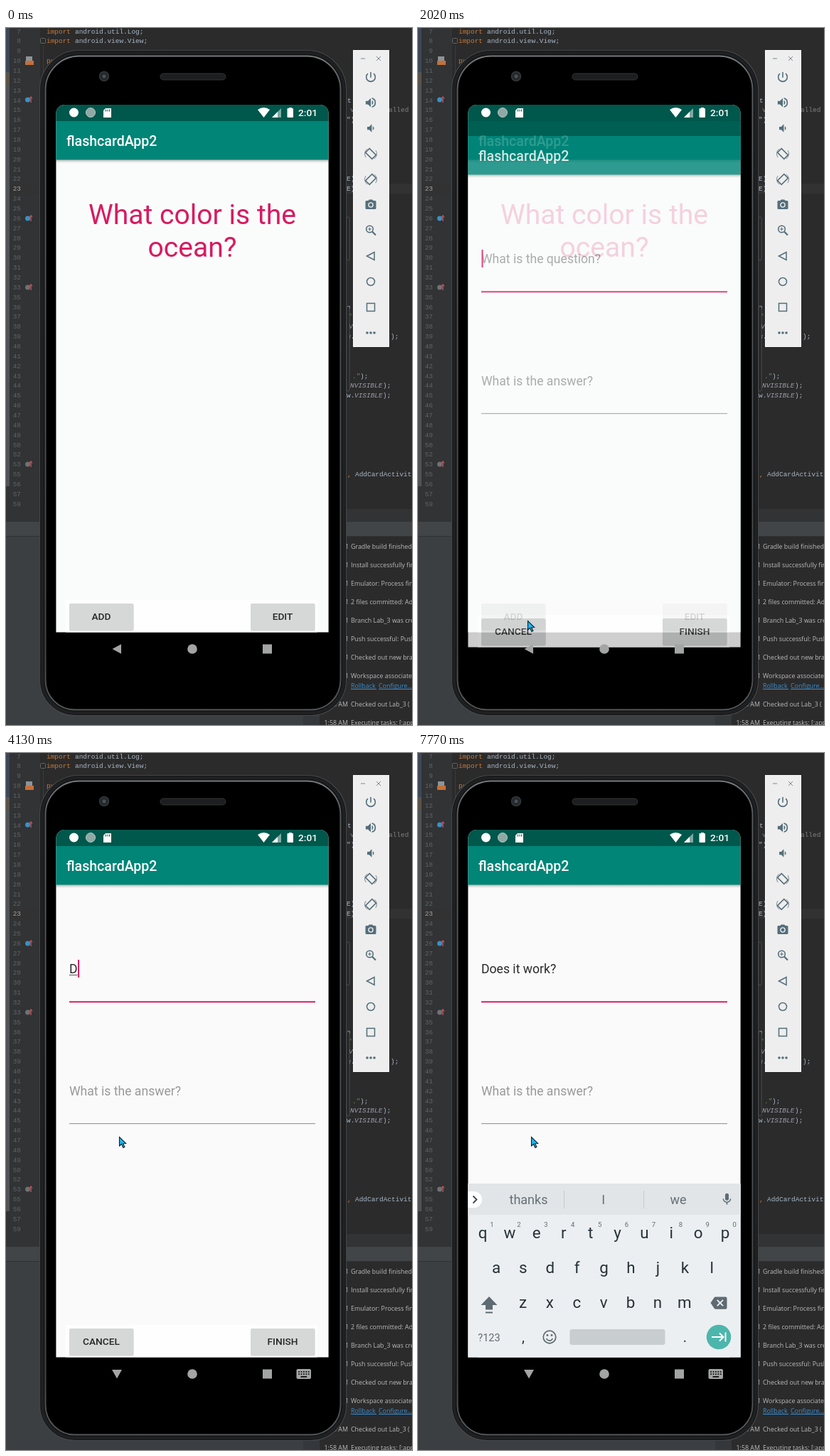
Animation of 571x981 px, one loop 8 s. Source, as an HTML page with a canvas:

```html
<!DOCTYPE html>
<html lang="en">
<head>
<meta charset="utf-8">
<title>Flashcard app</title>
<style>
html, body { margin: 0; width: 100%; height: 100%; overflow: hidden; background: #2b2b2b; }
canvas { display: block; width: 571px; height: 981px; }
</style>
</head>
<body>
<canvas id="stage"></canvas>
<script>
const W = 571, H = 981, LOOP = 8000;
const dpr = window.devicePixelRatio || 1;
const stage = document.getElementById('stage');
const layer = document.createElement('canvas');
for (const c of [stage, layer]) { c.width = W * dpr; c.height = H * dpr; }
const main = stage.getContext('2d'), sheet = layer.getContext('2d');
let g = main;

const ROBOTO = 'Roboto, sans-serif', MONO = '"Liberation Mono", monospace', UI = '"Open Sans", sans-serif';
const PINK = '#d81b60', TEAL = '#008577', DARK_TEAL = '#00574b', SLATE = '#546e7a';
const SP = .978; // screen pixels per Android sp
const sp = (size, weight = 400) => `${weight} ${size * SP}px ${ROBOTO}`;

// ---- helpers ----
function rect(x, y, w, h, color) { g.fillStyle = color; g.fillRect(x, y, w, h); }
function round(x, y, w, h, r, fill, stroke, lw = 1) {
  g.beginPath(); g.roundRect(x, y, w, h, r);
  if (fill) { g.fillStyle = fill; g.fill(); }
  if (stroke) { g.strokeStyle = stroke; g.lineWidth = lw; g.stroke(); }
}
function disc(x, y, r, fill, stroke, lw = 1) {
  g.beginPath(); g.arc(x, y, r, 0, 7);
  if (fill) { g.fillStyle = fill; g.fill(); }
  if (stroke) { g.strokeStyle = stroke; g.lineWidth = lw; g.stroke(); }
}
function poly(pts, fill, stroke, lw = 1, open) {
  g.beginPath();
  for (let i = 0; i < pts.length; i += 2) g.lineTo(pts[i], pts[i + 1]);
  if (!open) g.closePath();
  if (fill) { g.fillStyle = fill; g.fill(); }
  if (stroke) { g.strokeStyle = stroke; g.lineWidth = lw; g.stroke(); }
}
function text(s, x, y, font, color, align = 'left') {
  g.font = font; g.fillStyle = color; g.textAlign = align; g.fillText(s, x, y);
}
function icon(d, cx, cy, size, color) {
  g.save();
  g.translate(cx - size / 2, cy - size / 2); g.scale(size / 24, size / 24);
  g.fillStyle = color; g.fill(new Path2D(d), 'evenodd');
  g.restore();
}
function track(keys, t) {
  if (t <= keys[0][0]) return keys[0].slice(1);
  for (let i = 1; i < keys.length; i++) {
    const [a, ...p] = keys[i - 1], [b, ...q] = keys[i];
    if (t < b) return p.map((v, j) => v + (q[j] - v) * (t - a) / (b - a));
  }
  return keys[keys.length - 1].slice(1);
}
const smooth = k => k * k * (3 - 2 * k);

const ICON = {
  power: 'M13 3h-2v10h2zM17.8 5.2l-1.4 1.4a7 7 0 1 1-8.8 0L6.2 5.2a9 9 0 1 0 11.6 0z',
  loud: 'M3 9v6h4l5 5V4L7 9zM14 8a4.5 4.5 0 0 1 0 8zM14 3.2v2.1a7 7 0 0 1 0 13.4v2.1a9 9 0 0 0 0-17.6z',
  quiet: 'M5 9v6h4l5 5V4L9 9zM16 8a4.5 4.5 0 0 1 0 8z',
  camera: 'M9 2L7.2 4H4a2 2 0 0 0-2 2v12a2 2 0 0 0 2 2h16a2 2 0 0 0 2-2V6a2 2 0 0 0-2-2h-3.2L15 2zM12 7a5 5 0 1 1 0 10a5 5 0 1 1 0-10zM12 8.8a3.2 3.2 0 1 0 0 6.4a3.2 3.2 0 1 0 0-6.4z',
  erase: 'M22 3H7c-.7 0-1.2.3-1.6.9L0 12l5.4 8.1c.4.5.9.9 1.6.9h15a2 2 0 0 0 2-2V5a2 2 0 0 0-2-2zM19 15.6L17.6 17 14 13.4 10.4 17 9 15.6l3.6-3.6L9 8.4 10.4 7l3.6 3.6L17.6 7 19 8.4 15.4 12z',
  mic: 'M12 14a3 3 0 0 0 3-3V5a3 3 0 0 0-6 0v6a3 3 0 0 0 3 3zM17.3 11a5.3 5.1 0 0 1-10.6 0H5a7 7 0 0 0 6 6.7V21h2v-3.3a7 7 0 0 0 6-6.7z'
};

// ---- code editor behind the phone ----
const FOLDED = [34, 51, 54, 58];
const CONST = '#a09cab';
const row = i => 4.5 + 13.86 * i;
function code(s, x, y, color = '#a9b7c6', style = '') {
  text(s, x, y + 3, style + ' 9.46px ' + MONO, color);
}
function drawEditor() {
  rect(0, 0, W, H, '#2b2b2b');
  rect(0, 0, 48, 695, '#313335');
  rect(0, 0, 5, 645, '#505456');
  rect(0, 0, 5, 62, '#3d4757');
  rect(0, 64, 5, 16, '#5b5348');
  rect(5, row(16) - 7, W, 14, '#323232');
  for (let n = 7, i = 0; n < 60; n++) {
    if (FOLDED.includes(n)) continue;
    text(n, 21, row(i) + 3, '9.4px ' + MONO, n === 23 ? '#a4a3a3' : '#606366', 'right');
    i++;
  }
  rect(52, 24, 1, 660, '#3a3c3d');
  for (const [i, pkg] of [[0, 'android.util.Log;'], [1, 'android.view.View;']]) {
    code('import', 57, row(i), '#cc7832');
    code(pkg, 97, row(i));
  }
  round(48.5, 14.5, 7, 7, 1, '#2b2b2b', '#606366');
  code('public', 57, row(3), '#cc7832');
  rect(28, 40, 9, 6, '#8d9499');
  rect(27, 46, 12, 6, '#c4703a');
  [[101, '#3592c4'], [268, '#3592c4'], [365, '#6e7274'], [614, '#6e7274']].forEach(([y, c]) => {
    disc(30.5, y, 3.5, c);
    poly([35, y + 4, 35, y - 4], null, '#db5860', 1.2, true);
    poly([33, y - 1.5, 35, y - 4.5, 37, y - 1.5], null, '#db5860', 1, true);
  });

  code('t', 480, row(7));
  code('v', 484, row(8), '#808080');
  code('alled', 538, row(8), '#808080');
  code('")', 479, row(9));
  code('E)', 479, row(15)); code('E)', 479, row(16));
  code('e', 479, row(28)); code('"', 481, row(29), '#6a8759');
  code('V', 482, row(30), CONST, 'italic');
  code('w.', 479, row(31)); code(');', 541, row(31));
  code('."', 487, row(35), '#6a8759'); code(');', 498, row(35));
  code('NVISIBLE', 484, row(36), CONST, 'italic'); code(');', 530, row(36));
  code('w.', 479, row(37)); code('VISIBLE', 490, row(37), CONST, 'italic'); code(');', 530, row(37));
  code(',', 480, row(45), '#cc7832'); code('AddCardActivity', 491, row(45));

  // event log
  const font = '8.9px ' + UI;
  rect(0, 677, W, 18, '#313335');
  rect(0, 695, W, 286, '#3c3f41');
  rect(0, 695, W, 20, '#414547');
  rect(0, 715, W, 1, '#2f3133');
  rect(418, 716, 24, 265, '#35383a');
  rect(441, 716, 130, 265, '#2b2b2b');
  ['Gradle build finished', 'Install successfully fin', 'Emulator: Process fini', '2 files committed: Add',
   'Branch Lab_3 was crea', 'Push successful: Push', 'Checked out new bran', 'Workspace associated',
   '', 'Checked out Lab_3 (', 'Executing tasks: [:app'].forEach((s, i) => {
    const y = i < 8 ? 733 + 26 * i : i === 9 ? 955 : 980.5;
    if (!s) return;
    text(s, 485, y, font, '#bbbbbb');
    text('1:58 AM', 481, y, font, '#bbbbbb', 'right');
  });
  text('Rollback', 485, 929, font, '#3b8fd0');
  text('Configure...', 524, 929, font, '#3b8fd0');
  rect(485, 930, 36, 1, '#3b8fd0'); rect(524, 930, 47, 1, '#3b8fd0');
}

// ---- phone body and side tools ----
function drawPhone() {
  round(479, 266, 4, 61, 2, '#232425', '#4c4e50');
  round(479, 392, 4, 119, 2, '#232425', '#4c4e50');
  const rim = g.createLinearGradient(0, 31, 0, 968);
  rim.addColorStop(0, '#7d8082'); rim.addColorStop(.06, '#58595b');
  rim.addColorStop(.9, '#434547'); rim.addColorStop(1, '#58595b');
  const shell = (inset, fill, stroke, lw) => {
    const top = 56 - inset, low = 50 - inset;
    round(47 + inset, 31 + inset, 432 - 2 * inset, 937 - 2 * inset, [top, top, low, low], fill, stroke, lw);
  };
  shell(.5, '#121314', '#45474a', 1.2);
  shell(4, null, '#1f2021', 4);
  shell(8.5, '#000', rim, 2);
  disc(138, 68, 6.5, '#25282a', '#343739', 1.5);
  disc(138, 68, 2.5, '#47525a');
  round(217, 64, 92, 9, 4.5, '#1d1e1f', '#323435');
}
function drawTools() {
  rect(488, 31, 51, 418, '#eeeeee');
  g.strokeStyle = '#fafafa'; g.lineWidth = 1; g.strokeRect(488.5, 31.5, 50, 417);
  const x = 513;
  poly([499, 43, 505, 43], null, '#7d878c', 1, true);
  poly([521, 40, 527, 46], null, '#7d878c', 1, true);
  poly([527, 40, 521, 46], null, '#7d878c', 1, true);
  icon(ICON.power, x, 69, 19, SLATE);
  icon(ICON.loud, x, 105, 19, SLATE);
  icon(ICON.quiet, x, 141, 17, SLATE);
  for (const [y, flip] of [[177, 1], [213, -1]]) {
    g.save(); g.translate(x, y); g.scale(flip, 1);
    g.save(); g.rotate(Math.PI / 4);
    g.strokeStyle = SLATE; g.lineWidth = 1.6; g.strokeRect(-6.5, -4, 13, 8);
    g.restore();
    g.beginPath(); g.arc(0, 0, 8.5, 2.5, 4.1); g.stroke();
    g.beginPath(); g.arc(0, 0, 8.5, -.6, 1); g.stroke();
    g.restore();
  }
  icon(ICON.camera, x, 249, 18, SLATE);
  disc(x - 1.5, 283, 4.8, null, SLATE, 1.6);
  poly([x + 2, 286.5, x + 7, 291.5], null, SLATE, 2.2, true);
  poly([x - 4, 283, x + 1, 283], null, SLATE, 1, true);
  poly([x - 1.5, 280.5, x - 1.5, 285.5], null, SLATE, 1, true);
  poly([x - 5.5, 321, x + 5, 315.5, x + 5, 326.5], null, SLATE, 1.5);
  disc(x, 357, 5.5, null, SLATE, 1.5);
  poly([x - 5.5, 387.5, x + 5.5, 387.5, x + 5.5, 398.5, x - 5.5, 398.5], null, SLATE, 1.5);
  for (const dx of [-5, 0, 5]) disc(x + dx, 429, 1.8, SLATE);
}

// ---- app screens ----
function drawAppBase(bg) {
  rect(70, 108, 384, 742.5, bg);
  rect(70, 108, 384, 23, DARK_TEAL);
  const shade = g.createLinearGradient(0, 185, 0, 190);
  shade.addColorStop(0, 'rgba(0,0,0,.28)'); shade.addColorStop(1, 'rgba(0,0,0,0)');
  rect(70, 185, 384, 5, shade);
  rect(70, 131, 384, 54.5, TEAL);
  text('flashcardApp2', 85, 166, sp(20, 500), '#fff');
  rect(84, 805, 354, 45.5, '#fefefe');
}
function drawStatus() {
  disc(95.5, 119, 6.5, '#fff');
  disc(119, 119, 6.5, '#8fa9a4', '#b5c7c3', 1);
  poly([140, 113, 148, 113, 148, 126, 137, 126, 137, 116], '#fff');
  for (const dx of [0, 2.5, 5]) rect(140 + dx, 114.5, 1, 3, DARK_TEAL);
  g.beginPath(); g.moveTo(362.5, 126); g.lineTo(354, 115); g.quadraticCurveTo(362.5, 109, 371, 115);
  g.closePath(); g.fillStyle = '#fff'; g.fill();
  poly([374, 126, 387, 126, 387, 113], '#7fa8a2');
  poly([374, 126, 382, 126, 382, 118], '#fff');
  rect(398, 112, 4, 2, '#fff');
  round(395.5, 113, 8.5, 13, 1, '#fff');
  text('2:01', 411, 124.3, sp(14, 500), '#fff');
}
function button(x, label) {
  round(x, 811, 90.5, 37.5, 2, 'rgba(0,0,0,.16)');
  round(x, 810, 90.5, 37, 2, '#d6d7d7');
  text(label, x + 45, 833, sp(14, 500), '#262727', 'center');
}
function drawCardScreen(t) {
  drawAppBase('#fafcfb');
  text('What color is the', 262, 276, sp(40), PINK, 'center');
  text('ocean?', 262, 322, sp(40), PINK, 'center');
  button(89, 'ADD'); button(344, 'EDIT');
  const k = Math.min(1, (t - 1490) / 210);
  if (k < 0) return;
  g.save();
  g.beginPath(); g.roundRect(89, 810, 90.5, 37, 2); g.clip();
  rect(89, 810, 91, 37, `rgba(0,0,0,${.03 + .05 * k})`);
  disc(155 - 7 * k, 834 - 5 * k, 8 + 21 * k, 'rgba(0,0,0,.03)');
  g.restore();
}

// time, letters typed so far
const TYPED = [[4130, 1], [4390, 2], [4420, 3], [5000, 4], [5200, 5], [5580, 6], [5690, 7], [5830, 8],
  [5980, 9], [6080, 10], [6220, 11], [6500, 12], [7300, 13]];
const PHRASE = 'Does it work?';
const CARET_OFF = [[2630, 3130], [3640, 4130], [4900, 5000], [6990, 7300], [7770, LOOP]];
const HINTS = [[4390, 'Do Does Dog'], [4420, "Doe Does Doesn't"], [5000, 'Does Dies Dues'], [5200, 'it not that'],
  [5580, 'I in is'], [5690, "it its it's"], [5830, 'is really was'], [5980, 'we was will'],
  [6080, "wo would won't"], [6220, 'wor work world'], [6500, 'work works worked'], [7300, 'thanks I we']];
function latest(list, t) {
  let v;
  for (const [at, x] of list) if (t >= at) v = x;
  return v;
}

function drawFormScreen(t) {
  drawAppBase('#fafafa');
  const font = sp(18), hint = '#999';
  const typed = PHRASE.slice(0, latest(TYPED, t) || 0);
  g.font = font;
  const end = 89 + g.measureText(typed).width;
  if (typed) {
    text(typed, 89, 310, font, '#2a2a2a');
    const word = typed.match(/\w*$/)[0];
    if (word) {
      const w = g.measureText(word).width;
      rect(end - w, 312, w, 1, '#555');
    }
  } else text('What is the question?', 89, 310, font, hint);
  if (!CARET_OFF.some(([a, b]) => t >= a && t < b)) rect(end + .5, 291, 2, 25, PINK);
  rect(89, 349.3, 346, 2, PINK);
  text('What is the answer?', 89, 482, font, hint);
  rect(89, 521, 346, 1.2, '#9c9c9c');
  button(89, 'CANCEL'); button(344, 'FINISH');
}

function drawKeyboard(words) {
  const ink = '#263238', soft = '#5f6b72';
  rect(70, 606, 384, 244.5, '#eceff1');
  rect(70, 606, 384, 44, '#e1e5e8');
  round(60, 617, 30, 23, 11.5, '#fff');
  poly([77.5, 623.5, 82.5, 628.5, 77.5, 633.5], null, '#37474f', 1.8, true);
  rect(205, 616, 1, 25, '#c5cacd'); rect(317, 616, 1, 25, '#c5cacd');
  words.split(' ').forEach((s, i) => text(s, 155.5 + 105.3 * i, 635, '18px ' + ROBOTO, '#667077', 'center'));
  icon(ICON.mic, 434.5, 628, 20, soft);
  const keys = (s, x, y) => [...s].forEach((c, i) => text(c, x + 37.9 * i, y, '22.4px ' + ROBOTO, ink, 'center'));
  keys('qwertyuiop', 91, 682.5);
  keys('asdfghjkl', 110, 731.5);
  keys('zxcvbnm', 147.5, 780.5);
  [...'1234567890'].forEach((c, i) => text(c, 104 + 37.9 * i, 667, '9.5px ' + ROBOTO, soft, 'center'));
  poly([100, 765, 111.5, 777, 105, 777, 105, 783.5, 95, 783.5, 95, 777, 88.5, 777], soft);
  rect(95, 786.5, 10, 2, soft);
  icon(ICON.erase, 423, 774, 23, soft);
  text('?123', 100, 827.5, '14.5px ' + ROBOTO, soft, 'center');
  text(',', 148, 829, '20px ' + ROBOTO, ink, 'center');
  text('.', 375.5, 829, '20px ' + ROBOTO, ink, 'center');
  disc(185, 822, 8.8, null, soft, 1.7);
  disc(182, 819.5, 1.4, soft); disc(188, 819.5, 1.4, soft);
  g.beginPath(); g.arc(185, 822.5, 4.6, .35, 2.8); g.stroke();
  round(213.5, 811, 134, 22, 3, '#c8cdd0');
  disc(423, 822, 17.3, '#4db6ac');
  poly([413, 822, 429, 822], null, '#fff', 2, true);
  poly([424, 816.5, 429.5, 822, 424, 827.5], null, '#fff', 2, true);
  rect(431.5, 815.5, 2, 13, '#fff');
}

function drawNav(typing) {
  const c = '#a3a5a5';
  if (typing) {
    poly([149, 868, 163, 868, 156, 880.5], c);
    round(408.5, 867, 20.5, 14, 2, c);
    for (let i = 0; i < 5; i++) {
      rect(411.2 + 3.4 * i, 870, 1.8, 1.8, '#111');
      rect(411.2 + 3.4 * i, 873.3, 1.8, 1.8, '#111');
    }
    rect(414.5, 877, 8.6, 1.8, '#111');
  } else poly([149.5, 874, 162, 867.3, 162, 880.7], c);
  disc(262, 874, 6.8, c);
  rect(361, 867.5, 13, 13, c);
}

function drawPointer(t) {
  if (t < 530) return;
  let x, y;
  if (t < 2490) {
    const k = smooth(Math.min(1, (t - 530) / 560));
    [x, y] = t < 1090 ? [158 * k, 733 + 103 * k] : track([[1090, 158, 836], [1230, 154, 834]], t);
  } else {
    const k = smooth(Math.min(1, (t - 2490) / 220));
    x = 154 + 5 * k; y = 834 - 294 * k;
  }
  g.save(); g.translate(x + .5, y + .5);
  poly([0, 0, 0, 12.5, 3, 10, 5.3, 15, 7.4, 14, 5.2, 9.3, 9.2, 9], '#1fb4f0', '#10222c', 1.1);
  g.restore();
}

// paints on a separate sheet so that a whole screen can fade as one
function slide(paint, dy, alpha) {
  g = sheet;
  g.setTransform(dpr, 0, 0, dpr, 0, 0);
  g.clearRect(0, 0, W, H);
  paint();
  g = main;
  g.globalAlpha = alpha;
  g.drawImage(layer, 0, Math.round(dy * dpr) / dpr, W, H);
  g.globalAlpha = 1;
}

// time, offset, opacity of the form screen
const RISE = [[1990, 38, .45], [2020, 21, .81], [2060, 13, .96], [2110, 6.5, 1], [2150, 4, 1], [2200, 2, 1],
  [2250, 1, 1], [2290, 0, 1]];

function drawScreen(t) {
  g.save();
  g.beginPath(); g.roundRect(70.4, 108, 383.2, 800, [12, 12, 0, 0]); g.clip();
  if (t < 2290) drawCardScreen(t);
  if (t >= 2290) drawFormScreen(t);
  else if (t >= 1990) {
    const [dy, alpha] = track(RISE, t);
    slide(() => drawFormScreen(t), dy, alpha);
  }
  drawStatus();
  const words = latest(HINTS, t);
  if (words) {
    if (t < 4420) slide(() => drawKeyboard(words), 47, .6);
    else drawKeyboard(words);
  }
  drawNav(t >= 4130);
  g.restore();
}

function draw(t) {
  g.setTransform(dpr, 0, 0, dpr, 0, 0);
  drawEditor();
  drawPhone();
  drawScreen(t);
  drawTools();
  drawPointer(t);
}

const start = performance.now();
function tick() {
  draw((performance.now() - start) % LOOP);
  requestAnimationFrame(tick);
}
tick();
</script>
</body>
</html>
```
